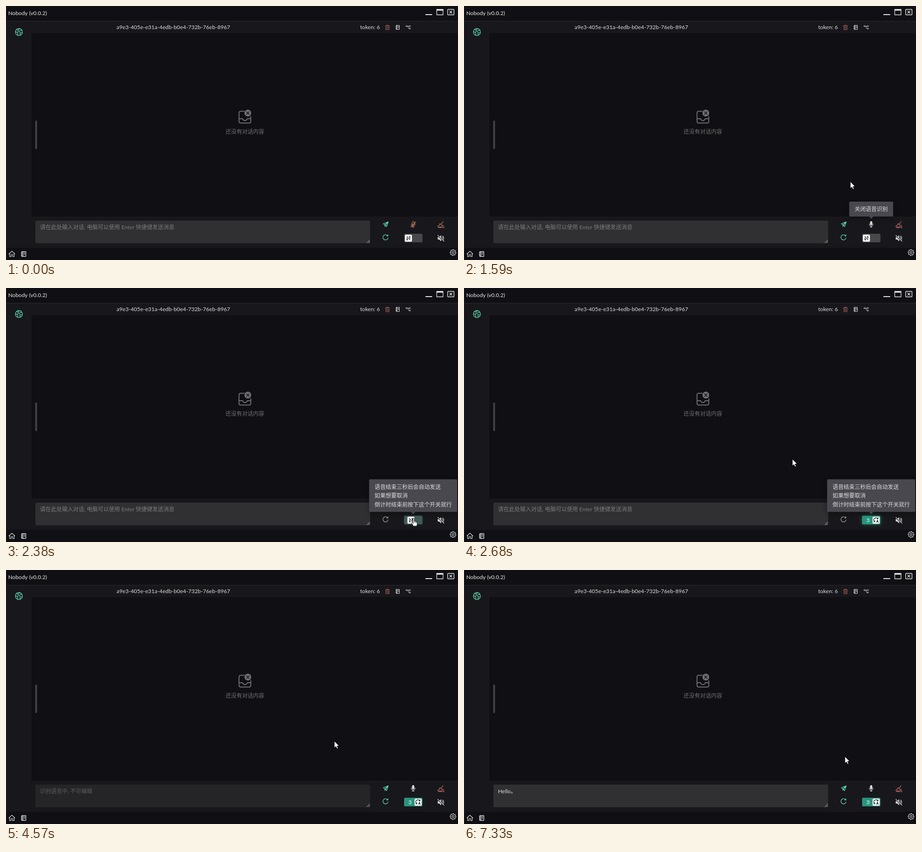
An HTML page with a canvas that plays this animation: 998 by 561 pixels, repeating every 8 s.

```html
<!DOCTYPE html>
<html lang="zh-CN">
<head>
<meta charset="utf-8">
<style>
html, body { margin: 0; width: 100%; height: 100%; overflow: hidden; background: #101014; }
canvas { display: block; }
</style>
</head>
<body>
<canvas id="stage" width="998" height="561"></canvas>
<script>
const ctx = document.getElementById('stage').getContext('2d');
const LOOP = 8000;
const FONT = '12.2px Lato, "Noto Sans CJK SC", "Noto Sans CJK", sans-serif';
const DARK = '#101014', PANEL = '#18181c', TEXT = '#dededf', GREEN = '#63e2b7';
const ORANGE = '#d68a69', RED = '#e27c79', LINE = '#2b2b2e';

const clamp = v => Math.max(0, Math.min(1, v));
const ramp = (t, a, b) => clamp((t - a) / (b - a));
const smooth = p => p * p * (3 - 2 * p);
const lerp = (a, b, p) => a + (b - a) * p;
const mix = (a, b, p) => `rgb(${a.map((v, i) => Math.round(lerp(v, b[i], p))).join(',')})`;

function box(x, y, w, h, color, r = 0) {
  ctx.fillStyle = color;
  ctx.beginPath();
  ctx.roundRect(x, y, w, h, r);
  ctx.fill();
}

function text(s, x, y, color = TEXT, align = 'left') {
  ctx.fillStyle = color;
  ctx.textAlign = align;
  ctx.fillText(s, x, y);
}

// Paths are relative to (x, y); a fill colour may be added to the stroke.
function icon(path, x, y, color, width = 1.1, fill) {
  ctx.save();
  ctx.translate(x, y);
  ctx.lineCap = ctx.lineJoin = 'round';
  const shape = new Path2D(path);
  if (fill) {
    ctx.fillStyle = fill;
    ctx.fill(shape);
  }
  if (color) {
    ctx.strokeStyle = color;
    ctx.lineWidth = width;
    ctx.stroke(shape);
  }
  ctx.restore();
}

const ring = r => `M${r} 0A${r} ${r} 0 1 1 ${-r} 0A${r} ${r} 0 1 1 ${r} 0Z`;

const PATHS = {
  globe: ring(7.8) + 'M-5 -6L-2 -4L-1 -1L-4 1L-7 -1M-2 -4L1 -7M-4 1L-2 4L-3 7M7 -3L3 -4L1 -1L3 2L2 5L4 6M3 2L7 1',
  trash: 'M-4.5 -3.5H4.5M-1.5 -3.5V-5H1.5V-3.5M-3.5 -3.5V5H3.5V-3.5M-1.2 -1V3M1.2 -1V3',
  book: 'M-3.5 -4.5H3.5V4.5H-3.5ZM-1.5 -4.5V4.5M.5 -2H2.2M.5 0H2.2M-4.3 -2H-3M-4.3 2H-3',
  flow: 'M-5 -2.5a1.3 1.3 0 1 0 2.6 0a1.3 1.3 0 1 0 -2.6 0M-2.4 -2.5H2.4M2.4 -2.5a1.3 1.3 0 1 0 2.6 0a1.3 1.3 0 1 0 -2.6 0M-1 -2.5Q0 -2.5 0 0Q0 2.8 2.4 2.8M2.4 2.8a1.3 1.3 0 1 0 2.6 0a1.3 1.3 0 1 0 -2.6 0',
  plane: 'M5.5 -5.5L-5.5 -1L-2 1.2L5.5 -5.5L2 5.5L-.3 2.2L-2 5V1.2M-.3 2.2L5.5 -5.5',
  refresh: 'M5.6 1A5.7 5.7 0 1 1 3.4 -4.6L5 -3.2M5.3 -6V-3H2.3',
  micBody: 'M-2 -4.4A2 2 0 0 1 2 -4.4V0A2 2 0 0 1 -2 0Z',
  micStand: 'M-4 -1V0A4 4 0 0 0 4 0V-1M0 4V6.4M-2 6.4H2',
  broom: 'M5.2 -7L1.2 -1.6M-2 -2.2L3.2 1.4M-2 -2.2Q-3 2 -6.5 3.2L-5 6.5H1.8Q3.4 4 3.2 1.4M-3.2 6.3L-2.2 3.8M-.7 6.3L.2 4.2M5 1.7H6.5M4.5 4.2H7M4 6.7H7.5',
  speaker: 'M-6 -2.3H-3.5L.5 -6V6L-3.5 2.3H-6Z',
  waves: 'M2.8 -2.8A4 4 0 0 1 2.8 2.8M4.2 -5.2A7 7 0 0 1 4.2 5.2',
  home: 'M-6.5 0L0 -6L6.5 0M-5 -1.2V6H-1.7V1.5H1.7V6H5V-1.2',
  notebook: 'M-4.2 -5.5H4.8V5H-4.2ZM-1.6 -5.5V5M.8 -2.8H2.8M.8 0H2.8M-5.2 -3H-3.6M-5.2 0H-3.6M-5.2 3H-3.6',
  arrow: 'M0 0V15L3.5 11.8L5.8 17L8.3 15.9L6 10.8H10.4Z',
  hand: 'M-1.4 0Q0 -1.2 1.3 0V5.8Q3.2 5 3.8 6.6Q5.5 5.9 6 7.5Q8 7.2 8 9V12Q8 14 6.6 17H-.6Q-1.5 14 -4.7 11Q-5 9 -3.3 9.2L-1.4 10.8Z',
  unlink: 'M-3.5 4V1.5M-3.5 3.8H-1M3.5 -4V-1.5M3.5 -3.8H1M-3.5 -3.8L3.5 3.8M-3.5 -1Q-3.5 1 -2 2M3.5 1Q3.5 -1 2 -2',
  cycle: 'M-4.8 1.5A5 5 0 0 1 3.8 -3.4M4.3 -5.5V-3H1.7M-2.4 4.2A5 5 0 0 1 -4.8 1.5M-4.8 4V1.5H-2.4M1 5L2.8 -.3L4.7 5M1.7 3.2H4'
};

function gearPath() {
  const points = [];
  for (let i = 0; i < 32; i++) {
    const a = i * Math.PI / 16;
    const r = i % 4 < 2 ? 6.6 : 5.2;
    points.push(`${(r * Math.cos(a)).toFixed(2)} ${(r * Math.sin(a)).toFixed(2)}`);
  }
  return `M${points.join('L')}Z${ring(2.2)}`;
}
const GEAR = gearPath();

const TRACK = [
  [80, 880, 487], [200, 694, 325], [530, 694, 325], [770, 875, 499],
  [990, 875, 499], [1090, 898, 483], [1440, 898, 483], [1590, 853, 388],
  [1730, 853, 388], [1990, 900, 509], [2540, 900, 509], [2640, 714, 367],
  [2680, 725, 378], [5840, 725, 378], [6050, 757, 382], [6590, 829, 380],
  [6840, 829, 380], [7080, 841, 412]
];

function cursorAt(t) {
  const next = TRACK.findIndex(k => k[0] > t);
  if (next < 0) return TRACK[TRACK.length - 1].slice(1);
  const a = TRACK[next - 1], b = TRACK[next];
  const p = ramp(t, a[0], b[0]);
  return [lerp(a[1], b[1], p), lerp(a[2], b[2], p)];
}

function drawCursor(t) {
  if (t < 80) return;
  const [x, y] = cursorAt(t);
  const hovering = x > 884 && x < 919 && y > 474 && y < 523;
  icon(hovering ? PATHS.hand : PATHS.arrow, x, y, '#08080a', 1, '#fff');
  if (hovering) icon('M1.3 6V9M3.8 7V9.5M6 8V10', x, y, '#111', .8);
}

function tooltip(lines, bottom, p) {
  if (p <= 0) return;
  ctx.save();
  ctx.font = FONT;
  const width = Math.max(...lines.map(s => ctx.measureText(s).width)) + 24;
  const height = lines.length * 19.5 + 13.5;
  const scale = .85 + .15 * p;
  ctx.globalAlpha = p;
  ctx.translate(899, bottom + 5);
  ctx.scale(scale, scale);
  ctx.shadowColor = 'rgba(0,0,0,.4)';
  ctx.shadowBlur = 12;
  ctx.shadowOffsetY = 3;
  box(-width / 2, -5 - height, width, height, '#48484e', 2.6);
  ctx.shadowColor = 'transparent';
  icon('M-5 -5.2H5L0 0Z', 0, 0, null, 0, '#48484e');
  lines.forEach((s, i) => text(s, 12 - width / 2, 12.8 - height + 19.5 * i + 3.2, TEXT));
  ctx.restore();
}

function drawWindow() {
  box(0, 0, 998, 561, DARK);
  box(0, 34, 56, 500, PANEL);
  box(56, 34, 942, 26, PANEL);
  box(56, 465, 942, 69, PANEL);
  box(0, 33, 998, 1, LINE);
  box(0, 0, 1, 561, '#222225');

  text('Nobody (v0.0.2)', 5, 20, '#ececed');
  box(926, 18, 15, 2, '#e8e8e9');
  icon('M0 0H14V12H0ZM0 1H14M0 2H14', 951, 7.5, '#e8e8e9', 1.3);
  icon('M1 0H13Q14 0 14 1V11Q14 12 13 12H1Q0 12 0 11V1Q0 0 1 0ZM4.5 3.5L9.5 8.5M9.5 3.5L4.5 8.5', 975.2, 7.5, '#e8e8e9', 1.4);

  icon(PATHS.globe, 28.5, 57.5, GREEN, 1.2);
  text('a9e3-405e-e31a-4edb-b0e4-732b-76eb-8967', 369.5, 51, TEXT, 'center');
  text('token: 6', 782, 51);
  icon(PATHS.trash, 842.3, 47.3, '#b46460', 1);
  icon(PATHS.book, 865, 47.3, '#dcdcdd', 1.1);
  icon(PATHS.flow, 888, 47, '#d5d5d6', 1);

  box(64.5, 253, 4, 63, '#444448', 2);
  icon('M12 0H4Q0 0 0 4V22Q0 26 4 26H22Q26 26 26 22V12M0 16.5H8Q9 20.5 13 20.5T18 16.5H26', 514.5, 232.5, '#707072', 2);
  icon(ring(8), 534, 236.5, DARK, 1, '#707072');
  icon('M-3 -3L3 3M3 -3L-3 3', 534, 236.5, DARK, 1.4);
  text('还没有对话内容', 527.3, 282, '#707072', 'center');

  icon(PATHS.home, 13, 547.5, '#dededf', 1.2);
  icon(PATHS.notebook, 39, 548, '#dededf', 1.3);
  icon(GEAR, 987, 544.5, '#dededf', 1.1);
}

function drawInput(t) {
  const listening = t >= 4570 && t < 7330;
  box(65, 474, 739, 50, listening ? '#252528' : '#303033', 2.6);
  if (t >= 7330) text('Hello。', 75, 493, TEXT);
  else if (listening) text('识别语音中, 不可编辑', 75, 493, '#5c5c5e');
  else text('请在此处输入对话, 电脑可以使用 Enter 快捷键发送消息', 75, 493, '#7b7b7d');
  icon('M0 6L6 0M3.5 6L6 3.5', 797, 517, '#c8c8c9', 1);
}

function drawMic(t) {
  const on = t >= 1330;
  const blink = smooth(ramp(t, 5060, 5190)) - smooth(ramp(t, 5550, 5680));
  const color = on ? mix([222, 222, 223], [99, 226, 183], blink) : ORANGE;
  icon(PATHS.micBody, 899, 482, color, 1, on ? color : null);
  icon(PATHS.micStand, 899, 482, color, 1.1);
  if (!on) icon('M-5.5 6L5.5 -6M-3.8 6L5.8 -4.5', 899, 482, color, 1);
}

function drawSwitch(t) {
  const p = smooth(ramp(t, 2320, 2500));
  ctx.save();
  if (p > 0 && t < 4570) {
    ctx.shadowColor = `rgba(42,148,125,${.6 * p})`;
    ctx.shadowBlur = 8;
  }
  box(879, 503, 40.5, 19, mix([72, 72, 75], [42, 148, 125], p), 2.6);
  ctx.restore();
  const x = lerp(880.8, 902.2, p);
  ctx.globalAlpha = p;
  text('3', 892, 517, '#fff', 'center');
  ctx.globalAlpha = 1;
  box(x, 505, 15.5, 15.5, '#fff', 2.6);
  icon(p < .5 ? PATHS.unlink : PATHS.cycle, x + 7.8, 512.8, '#18181c', 1.2);
}

function drawControls(t) {
  const muted = t >= 2330 && t < 2960;
  icon(PATHS.plane, 838.5, 482, GREEN, 1.1);
  icon(PATHS.refresh, 838, 511, muted ? '#a4aaa8' : GREEN, 1.2);
  drawMic(t);
  icon(PATHS.broom, 960, 483, t < 1140 ? ORANGE : RED, 1.1);
  drawSwitch(t);
  icon(PATHS.speaker, 960, 513, '#dededf', .8, '#dededf');
  icon(PATHS.waves, 960, 513, '#dededf', 1.2);
  icon('M-6.5 -6L7 7', 960, 513, PANEL, 3);
  icon('M-6.5 -6.5L7 6.5', 960, 513, '#dededf', 1.2);
}

function drawTooltips(t) {
  const mic = smooth(ramp(t, 1140, 1290)) - smooth(ramp(t, 1735, 1885));
  tooltip([t < 1330 ? '开启语音识别' : '关闭语音识别'], 465, mic);
  const send = smooth(ramp(t, 2076, 2226)) - smooth(ramp(t, 2750, 2920));
  tooltip(t < 2330
    ? ['开启识别后自动发送']
    : ['语音结束三秒后会自动发送', '如果想要取消', '倒计时结束前按下这个开关就行'], 494.5, send);
}

function render(now) {
  const t = now % LOOP;
  ctx.font = FONT;
  ctx.textBaseline = 'alphabetic';
  drawWindow();
  drawInput(t);
  drawControls(t);
  drawTooltips(t);
  drawCursor(t);
}

let start;
function tick(now) {
  start ??= now;
  render(now - start);
  requestAnimationFrame(tick);
}
requestAnimationFrame(tick);
</script>
</body>
</html>
```
